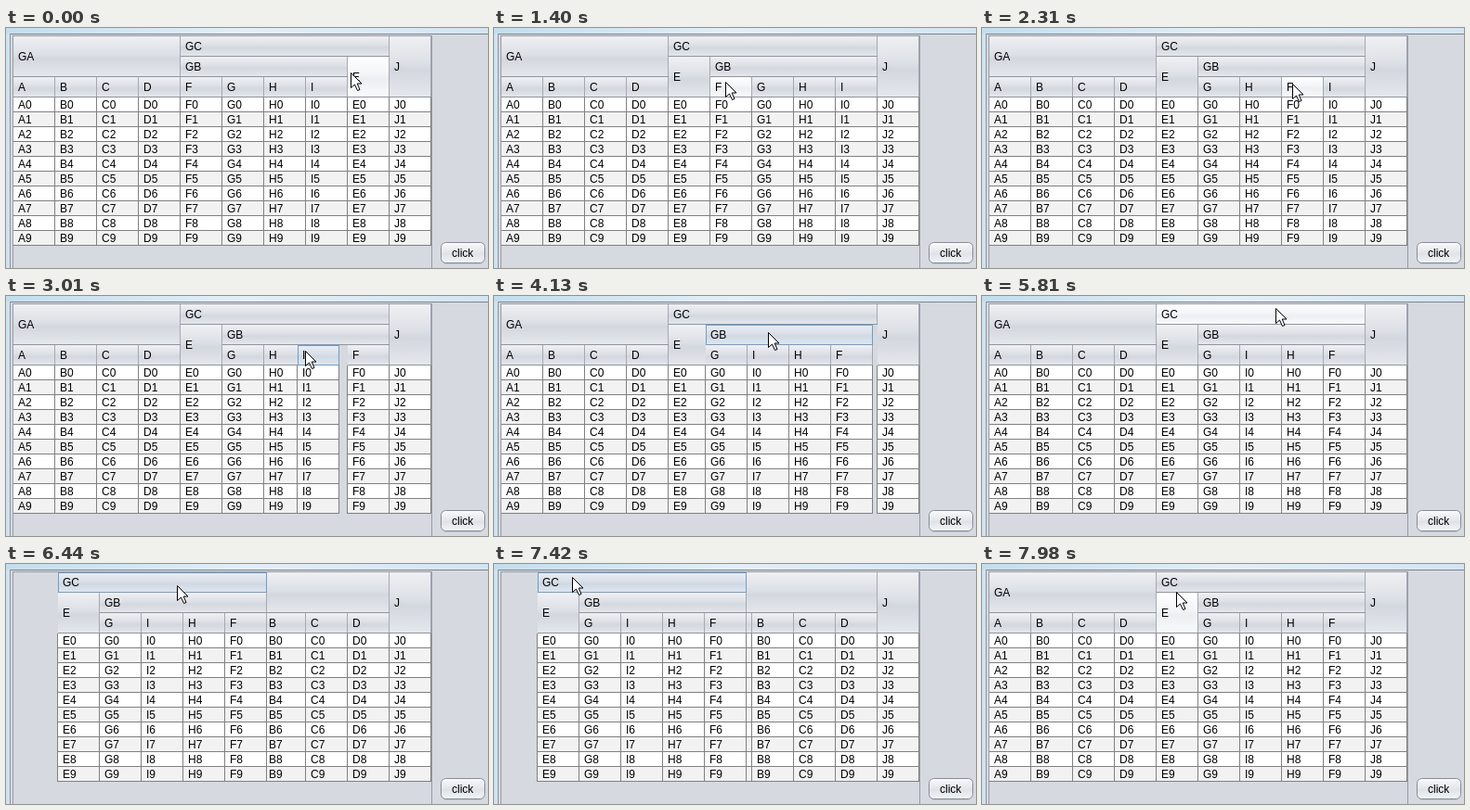
These frames come from a looping animation (519x259 px, 8000 ms). An HTML page with a canvas:

```html
<!DOCTYPE html>
<html lang="en">
<head>
<meta charset="utf-8">
<title>Grouped table header</title>
<style>
  html, body { margin: 0; width: 100%; height: 100%; overflow: hidden; background: #d6d9df; }
  canvas { display: block; }
</style>
</head>
<body>
<canvas id="stage" width="519" height="259"></canvas>
<script>
const ctx = document.getElementById('stage').getContext('2d');
const LOOP = 8000, STEP = 70;
const LEFT = 8, RIGHT = 458, COL = 45, ROW = 16, ROWS = 10, HEAD = 22, TOP = 9, BODY = 75;
const BG = '#d6d9df', GRID = '#808080', EDGE = '#979ba6';

// Each drag: grabbed at `at`, moved by dx in `dur`, let go at `drop`.
// grip is the pointer's distance from the group's left edge.
const drags = [
  { name: 'E', at: 70, dur: 560, drop: 770, dx: -124, grip: 3, y: 48, dy: -12 },
  { name: 'F', at: 1470, dur: 490, drop: 2310, dx: 85, grip: 16, y: 58, dy: 2 },
  { name: 'I', at: 2660, dur: 580, drop: 3640, dx: -89, grip: 8, y: 59, dy: 0 },
  { name: 'GB', at: 4060, dur: 560, drop: 4690, dx: -38, grip: 67, y: 39, dy: 0 },
  { name: 'GB', at: 4970, dur: 420, drop: 5460, dx: 45, grip: 79, y: 40, dy: -2 },
  { name: 'GC', at: 5880, dur: 700, drop: 6720, dx: -165, grip: 128, y: 13, dy: 12 },
  { name: 'GC', at: 7280, dur: 490, drop: 7910, dx: 135, grip: 37, y: 14, dy: 0 },
  { name: 'E', at: LOOP + 50, grip: 21, y: 30 }
];

const skins = {
  normal: ['#eff0f3', '#dcdfe5', '#d3d7de', '#e5e8ed'],
  hover: ['#ffffff', '#f3f4f7', '#eceef2', '#fafbfd'],
  pressed: ['#e9eef5', '#d9dfe8', '#d0d8e3', '#dfe7f0'],
  button: ['#fbfbfc', '#e6e8ec', '#dfe2e7', '#f4f6f9']
};

const mix = (a, b, k) => Math.round(a + (b - a) * k);
const smooth = k => k * k * (3 - 2 * k);
const clamp = k => Math.max(0, Math.min(1, k));

const node = (name, kids = []) => ({ name, kids });
const leaves = s => [...s].map(c => node(c));

function makeTree() {
  const tree = node('', [
    node('GA', leaves('ABCD')),
    node('GC', [node('GB', leaves('FGHI')), node('E')]),
    node('J')
  ]);
  place(tree, LEFT, TOP);
  return tree;
}

// Sets x, width and header box; returns the width
function place(n, x, y) {
  n.x = x;
  n.y = y;
  if (!n.kids.length) {
    n.h = BODY - y;
    return n.w = COL;
  }
  n.h = n.name === 'GA' ? 2 * HEAD : HEAD;
  const below = n.name ? y + n.h : y;
  n.w = 0;
  for (const k of n.kids) n.w += place(k, x + n.w, below);
  return n.w;
}

function find(n, name, parent) {
  if (n.name === name) return { self: n, parent };
  for (const k of n.kids) {
    const hit = find(k, name, n);
    if (hit) return hit;
  }
  return null;
}

// Swap with a neighbour once its middle is passed
function settle(tree, name, x) {
  for (;;) {
    const { self, parent } = find(tree, name);
    const row = parent.kids, i = row.indexOf(self);
    const prev = row[i - 1], next = row[i + 1];
    let j = i;
    if (prev && x < prev.x + prev.w / 2) j = i - 1;
    else if (next && x + self.w > next.x + next.w / 2) j = i + 1;
    if (j === i) return;
    [row[i], row[j]] = [row[j], row[i]];
    place(tree, LEFT, TOP);
  }
}

// Replays the drags up to time t
function stateAt(t) {
  const tree = makeTree();
  let pen = { x: 0, y: 0 }, since = -STEP, last = '';
  for (const d of drags) {
    const { self } = find(tree, d.name);
    const home = self.x;
    if (t < d.at + STEP) {
      const k = smooth(clamp((t - since) / (d.at - STEP - since)));
      return {
        tree,
        hover: k < 0.5 ? last : d.name,
        pen: { x: mix(pen.x, home + d.grip, k), y: mix(pen.y, d.y, k) }
      };
    }
    let x = home;
    for (let s = d.at + STEP; s <= t && s < d.drop; s += STEP) {
      const p = clamp((s - d.at) / d.dur);
      x = mix(home, home + d.dx, p);
      pen = { x: x + d.grip, y: mix(d.y, d.y + d.dy, p) };
      settle(tree, d.name, x);
    }
    if (t < d.drop) return { tree, pen, held: self, x };
    since = d.drop;
    last = d.name;
  }
}

function rect(color, x, y, w, h) {
  ctx.fillStyle = color;
  ctx.fillRect(x, y, w, h);
}

function shade(colors, y, h) {
  const g = ctx.createLinearGradient(0, y, 0, y + h);
  [0, 0.45, 0.55, 1].forEach((p, i) => g.addColorStop(p, colors[i]));
  return g;
}

function label(s, x, y) {
  ctx.fillStyle = '#000';
  ctx.fillText(s, x, y);
}

const bodyLine = x => rect(GRID, x - 1, BODY, 1, ROWS * ROW);

function header(n, x, skin) {
  rect(shade(skins[skin], n.y, n.h), x, n.y, n.w, n.h);
  rect('#a4a8b2', x + n.w - 1, n.y, 1, n.h);
  rect('#8f949f', x, n.y + n.h - 1, n.w, 1);
  if (skin === 'pressed') {
    ctx.strokeStyle = '#6f9dca';
    ctx.strokeRect(x + 0.5, n.y + 0.5, n.w - 1, n.h - 1);
  }
  label(n.name, x + 5, n.y + n.h / 2 + 4);
}

function column(n, x) {
  for (let r = 0; r < ROWS; r++) {
    const y = BODY + r * ROW;
    rect(r % 2 ? '#f2f2f2' : '#fff', x, y, COL, ROW);
    rect(GRID, x, y + ROW - 1, COL, 1);
    label(n.name + r, x + 5, y + 12);
  }
  bodyLine(x + COL);
}

function drawNode(n, dx, st) {
  if (n === st.held && !dx) return;
  if (n.name) {
    const skin = n === st.held ? 'pressed' : n.name === st.hover ? 'hover' : 'normal';
    header(n, n.x + dx, skin);
  }
  if (!n.kids.length) column(n, n.x + dx);
  n.kids.forEach(k => drawNode(k, dx, st));
}

function drawTable(st) {
  const { tree, held, x } = st;
  ctx.save();
  ctx.beginPath();
  ctx.rect(LEFT, TOP, RIGHT - LEFT, 250);
  ctx.clip();
  drawNode(tree, 0, st);
  if (held) {
    bodyLine(held.x + held.w);
    drawNode(held, x - held.x || 1e-6, st);
    bodyLine(x);
  }
  ctx.restore();
}

function drawWindow() {
  rect(BG, 0, 0, 519, 259);
  const sky = ctx.createLinearGradient(0, 0, 519, 0);
  ['#c3deee', '#e3eff8', '#d3e5f3'].forEach((c, i) => sky.addColorStop(i / 2, c));
  rect(sky, 0, 0, 519, 6);
  rect('#cfe2ef', 0, 6, 4, 253);
  rect('#7b858f', 4, 6, 515, 1);
  rect('#8d979f', 4, 6, 1, 253);
  rect(EDGE, 7, 8, 452, 1);
  rect(EDGE, 7, 8, 1, 251);
  rect(EDGE, RIGHT, 8, 1, 251);
}

function drawButton() {
  ctx.beginPath();
  ctx.roundRect(468.5, 231.5, 47, 22, 5);
  ctx.fillStyle = shade(skins.button, 231, 23);
  ctx.fill();
  ctx.strokeStyle = '#868b96';
  ctx.stroke();
  rect('#bfc3cb', 472, 254, 40, 1);
  label('click', 480, 247);
}

function drawPointer({ x, y }) {
  const p = [0, 0, 0, 16, 4, 12.5, 7, 19, 9.5, 18, 6.7, 11.5, 11.5, 11.5];
  ctx.beginPath();
  for (let i = 0; i < p.length; i += 2) ctx.lineTo(x + 0.5 + p[i], y + 0.5 + p[i + 1]);
  ctx.closePath();
  ctx.fillStyle = '#fff';
  ctx.fill();
  ctx.strokeStyle = '#000';
  ctx.stroke();
}

function draw(t) {
  const st = stateAt(t);
  ctx.font = '12px "Liberation Sans", Arial, sans-serif';
  ctx.lineWidth = 1;
  drawWindow();
  drawTable(st);
  drawButton();
  drawPointer(st.pen);
}

let shown = -1;
const start = performance.now();
function tick() {
  const t = (performance.now() - start) % LOOP;
  const step = Math.floor(t / STEP) * STEP;
  if (step !== shown) {
    shown = step;
    draw(step);
  }
  requestAnimationFrame(tick);
}
tick();
</script>
</body>
</html>
```
